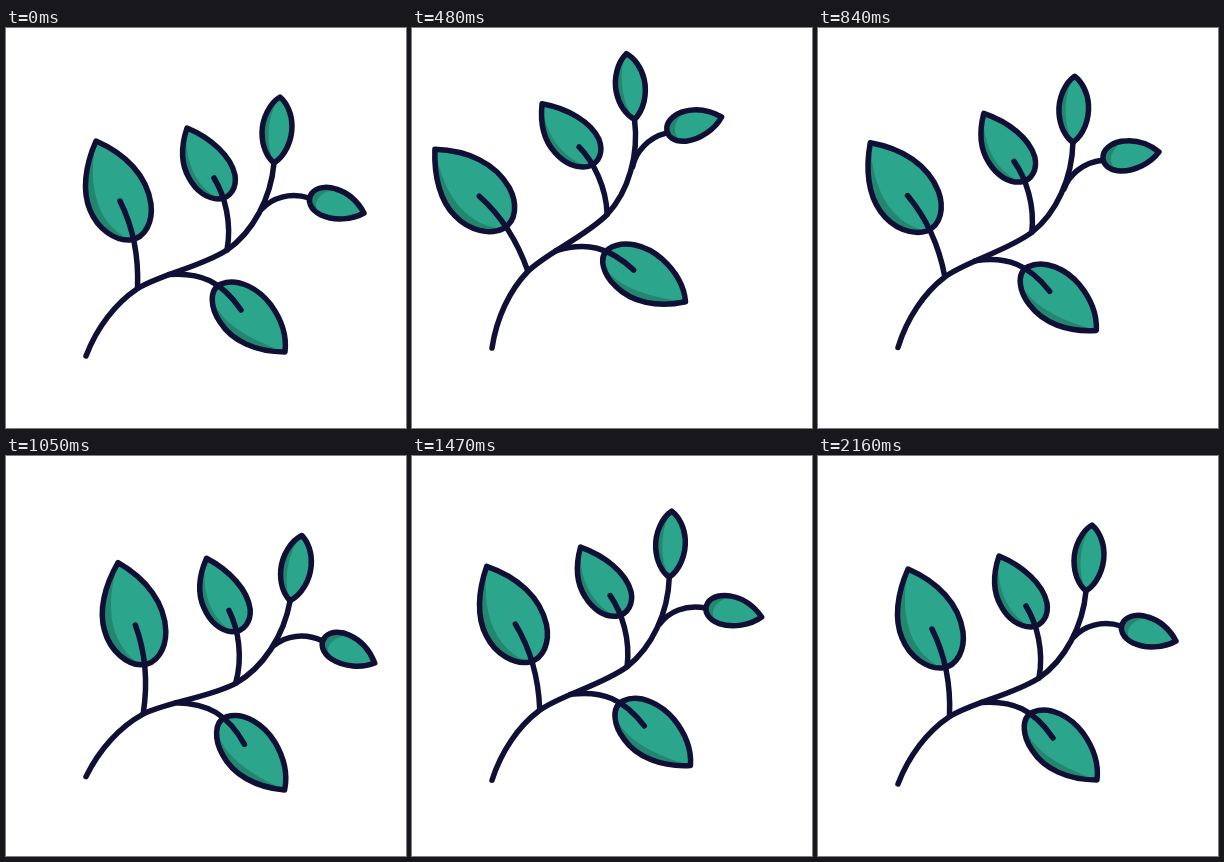
Write an HTML page that moves like this. It is 400x400 px and loops after 4.19 s.

```html
<!DOCTYPE html>
<html lang="en">
<head>
<meta charset="utf-8">
<title>Swaying branch</title>
<style>
  html, body { margin: 0; width: 100%; height: 100%; overflow: hidden; background: #fff; }
  svg { display: block; width: 100%; height: 100%; }
  .line { fill: none; stroke: #100f35; stroke-width: 5.5; stroke-linecap: round; stroke-linejoin: round; }
  .leaf { fill: #2ca58d; }
  .shade { fill: #23866f; }
</style>
</head>
<body>
<svg id="stage" viewBox="0 0 400 400"></svg>
<script>
const LOOP = 4190, STEP = 30;

// Each spray: leaf outline, shaded side, branch with vein.
const sprays = [
  {
    id: 'low',
    leaf: 'M279 324C250 324 226 313 214 294C205 281 202 262 215 256C232 249 253 261 265 277C275 291 281 308 279 324Z',
    shade: 'M279 324C250 324 226 313 214 294C208 285 205 277 206 270C215 295 242 311 279 324Z',
    branch: 'M163 246.500C195 244 216 254 235 282'
  },
  {
    id: 'left',
    leaf: 'M90 113C79 138 76 163 84 182C92 202 110 213 124 212C140 210 147 193 145 176C141 148 120 126 90 113Z',
    shade: 'M90 113C79 138 76 163 84 182C92 202 110 213 124 212C95 198 80 165 90 113Z',
    branch: 'M131.500 260C133 225 125 195 114 173'
  },
  {
    id: 'middle',
    leaf: 'M181 100C175 118 175 136 183 150C190 163 201 171 213 171C225 170 231 159 229 147C225 128 205 110 181 100Z',
    shade: 'M181 100C175 118 175 136 183 150C190 163 201 171 213 171C192 160 177 135 181 100Z',
    branch: 'M221 222C226 195 219 168 208 150'
  },
  {
    id: 'top',
    leaf: 'M274 69C264 75 256 90 256 105C256 118 261 129 268 135C279 128 286 113 286 98C286 86 281 75 274 69Z',
    shade: 'M274 69C264 75 256 90 256 105C256 118 261 129 268 135C260 118 260 88 274 69Z',
    branch: ''
  },
  {
    id: 'right',
    leaf: 'M358 185C346 192 328 193 315 187C305 182 300 173 306 165C311 159 321 158 330 161C343 165 352 174 358 185Z',
    shade: 'M312 185C305 182 300 173 306 165C311 159 321 158 330 161C314 164 306 173 312 185Z',
    branch: 'M256 181C266 170 284 164 303 170'
  }
];
const stem = 'M80 328C91 299 110 275 131 261C152 247 195 239 221 222C247 204 265 170 268 135';

const path = (cls, d) => d && `<path class="${cls}" d="${d}"/>`;
const spray = s => `<g id="${s.id}">${path('leaf', s.leaf)}${path('shade', s.shade)}${path('line', s.leaf)}${path('line', s.branch)}</g>`;
const stage = document.getElementById('stage');
stage.innerHTML = `<g id="plant">${sprays.map(spray).join('')}${path('line', stem)}</g>`;
const [plant, left, right] = ['plant', 'left', 'right'].map(id => document.getElementById(id));

// [time, value] keys
const sway = [[0, 0], [615, 13.9], [1045, -5], [1470, 3.1], [1890, -1.2], [2160, 0]];
const follow = [[110, 0], [700, 13.4], [1140, -2.9], [1580, 2.2], [1990, -0.7], [2160, 0]];
const lift = [[0, 0], [620, -9], [2160, 0]];

function at(keys, t) {
  const i = keys.findIndex(k => k[0] > t);
  if (i === 0) return keys[0][1];
  if (i < 0) return keys[keys.length - 1][1];
  const [t0, a] = keys[i - 1], [t1, b] = keys[i];
  return a + (b - a) * (1 - Math.cos(Math.PI * (t - t0) / (t1 - t0))) / 2;
}

const turn = (deg, x, y) => `rotate(${-deg} ${x} ${y})`;

function draw(t) {
  const lag = at(follow, t);
  plant.setAttribute('transform', `translate(0 ${at(lift, t)}) ${turn(at(sway, t), 80, 328)}`);
  left.setAttribute('transform', turn(lag, 131, 261));
  right.setAttribute('transform', turn(lag * 2.07, 256, 181));
}

const start = performance.now();
function tick() {
  const t = (performance.now() - start) % LOOP;
  draw(Math.floor(t / STEP) * STEP);
  requestAnimationFrame(tick);
}
draw(0);
requestAnimationFrame(tick);
</script>
</body>
</html>
```
